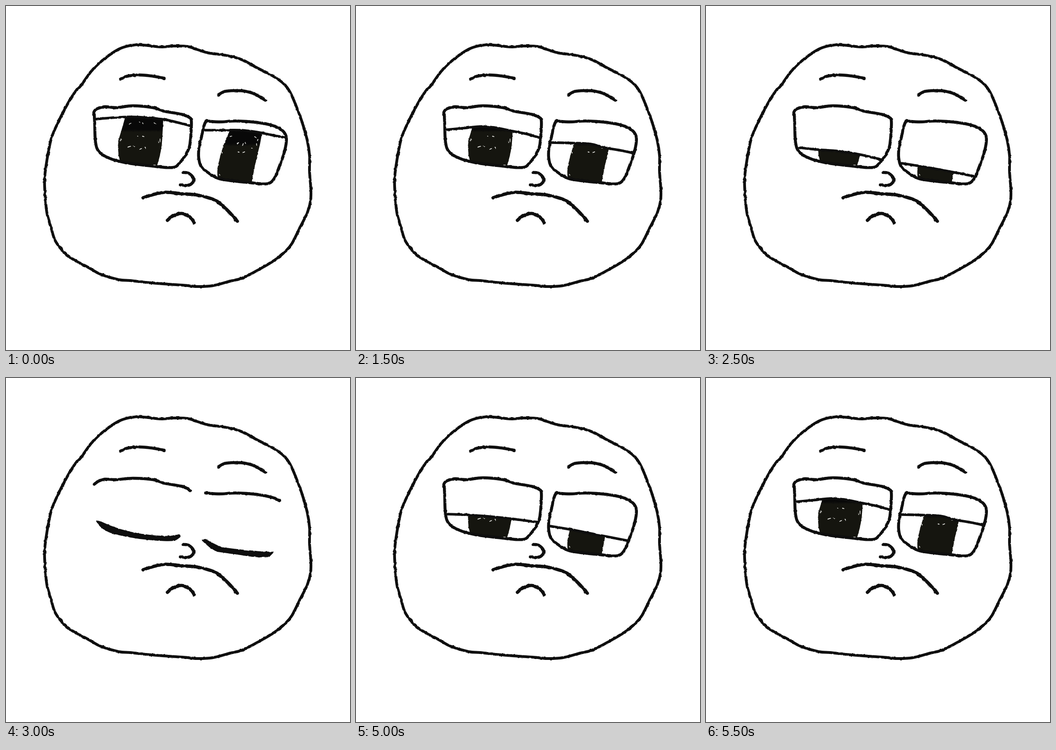
Write an HTML page that moves like this. It is 748x748 px and loops after 6 s.

```html
<!DOCTYPE html>
<html lang="en">
<head>
<meta charset="utf-8">
<title>Sleepy face</title>
<style>
  html, body { margin: 0; width: 100%; height: 100%; overflow: hidden; background: #fff; }
  svg { display: block; width: 100%; height: 100%; }
  path { fill: none; stroke: #0e0e0e; stroke-width: 6.4; stroke-linecap: round; stroke-linejoin: round; }
  .head { stroke-width: 6; }
  .bold { stroke-width: 7.2; }
  .lid { stroke-width: 5.6; }
  .iris { fill: url(#ink); stroke: none; }
  .specks { stroke: #f4f4f0; stroke-width: 1.5; }
  .cover { fill: #fff; stroke: none; }
  .lash { fill: #0e0e0e; stroke-width: 2; }

  .timed { opacity: 0; animation: 6s step-end infinite; }
  .open { animation-name: open; }
  .wide { animation-name: wide; }
  .drowsy { animation-name: drowsy; }
  .heavy { animation-name: heavy; }
  .narrow { animation-name: narrow; }
  .closed { animation-name: closed; }
  @keyframes open { 0%, 75% { opacity: 1 } 50% { opacity: 0 } }
  @keyframes wide { 0% { opacity: 1 } 25%, 100% { opacity: 0 } }
  @keyframes drowsy { 0%, 33.333%, 100% { opacity: 0 } 25%, 91.666% { opacity: 1 } }
  @keyframes heavy { 0%, 41.666%, 91.666% { opacity: 0 } 33.333%, 83.333% { opacity: 1 } }
  @keyframes narrow { 0%, 50%, 83.333% { opacity: 0 } 41.666%, 75% { opacity: 1 } }
  @keyframes closed { 0%, 75% { opacity: 0 } 50% { opacity: 1 } }
</style>
</head>
<body>
<svg viewBox="0 0 748 748">
  <defs>
    <linearGradient id="ink" x2="0" y2="1">
      <stop offset=".25" stop-color="#080808"/>
      <stop offset=".3" stop-color="#15150f"/>
    </linearGradient>
    <!-- Roughens the pen strokes slightly. -->
    <filter id="rough" filterUnits="userSpaceOnUse" x="0" y="0" width="748" height="748" color-interpolation-filters="sRGB">
      <feTurbulence type="fractalNoise" baseFrequency=".14" numOctaves="2" seed="4"/>
      <feDisplacementMap in="SourceGraphic" scale="3" xChannelSelector="R" yChannelSelector="G"/>
    </filter>
  </defs>
  <g filter="url(#rough)">
    <g class="timed open">
      <path class="iris" d="M259 242Q252 268 245 290Q241 315 249 341L328 349Q339 315 340 285L342 244Z"/>
      <path class="iris" d="M487 270Q470 305 463 338Q457 360 461 377L534 385Q542 340 552 302L557 275Z"/>
      <path class="specks" d="M268 257l3-2M289 252l2 1M297 254l1 2M322 254l3 2M265 307l6-2M277 304l3 2M291 311l4-1M302 307l2 3M297 283l3 1M286 283l1 0M249 293l1-3M335 289l0 7M331 294l1 3M321 345l3 0"/>
      <path class="specks" d="M488 284l3-1M502 299l4-2M514 303l2-4M520 297l1 2M541 284l2 2M547 289l0 4M545 299l-1 4M505 317l2 1M515 319l4-2M534 309l2 1M470 318l0 2M464 366l1 2"/>
    </g>

    <g class="timed wide">
      <path class="lid" data-points="195,246 230,243 270,241 310,243 350,248 380,255 403,261"/>
      <path class="lid" data-points="429,270 470,270 510,270 545,274 580,281 607,286"/>
    </g>
    <g class="timed drowsy">
      <path class="lid" data-points="197,269 240,265 270,262 300,264 340,272 370,278 398,286"/>
      <path class="lid" data-points="425,297 470,298 510,300 540,308 575,314 604,320"/>
    </g>
    <g class="timed heavy">
      <path class="lid" data-points="200,296 250,298 320,304 392,313"/>
      <path class="lid" data-points="422,322 470,330 530,342 592,354"/>
    </g>
    <g class="timed narrow">
      <path class="lid" data-points="203,308 240,312 290,316 340,324 384,335"/>
      <path class="lid" data-points="426,342 470,349 530,360 587,371"/>
    </g>

    <g class="timed open">
      <path data-points="192,237 191,231 197,224 215,219 240,221 276,217 320,221 345,229 380,235 398,242 403,250 402,280 399,305 390,325 376,343 364,351 335,350 300,346 262,341 230,333 208,322 198,310 194,290 193,260 192,237"/>
      <path data-points="435,250 465,252 500,250 545,253 580,260 600,270 609,283 609,300 603,325 594,350 585,372 575,384 560,387 530,384 500,381 465,376 445,366 425,350 419,330 420,305 425,285 430,262 435,250"/>
    </g>

    <g class="timed closed">
      <path data-points="192,231 200,225 215,220 240,221 276,218 320,221 345,229 380,235 392,239 400,245"/>
      <path data-points="434,250 465,252 500,250 545,253 580,260 595,267"/>
      <path class="lash" d="M197 311L204 312Q245 332 290 339Q335 346 360 344L377 340L379 345L368 353Q345 355 310 351Q265 347 228 336Q205 327 197 311Z"/>
      <path class="lash" d="M427 353L434 351Q452 362 470 369Q515 375 555 378L581 379L572 388Q550 391 510 384L460 377Q445 371 427 353Z"/>
    </g>

    <path class="head" data-points="285,84 310,86 337,89 365,87 395,88 420,96 440,102 470,106 495,111 518,119 545,134 580,152 605,170 618,188 630,215 643,250 655,292 660,325 660,360 663,400 662,425 655,450 640,480 622,516 608,533 585,552 550,573 515,591 485,599 450,608 415,610 385,607 340,604 305,601 270,597 245,595 205,583 180,569 155,556 131,540 108,512 98,482 89,450 85,410 84,375 89,335 98,290 110,260 130,220 150,187 163,173 187,140 215,114 245,94 265,87 285,84"/>
    <path data-points="249,159 262,153 290,150 315,152 344,157"/>
    <path data-points="462,193 475,186 495,184 518,185 540,191 564,205"/>
    <path data-points="385,362 395,363 404,369 408,377 405,385 396,390 379,389"/>
    <path class="bold" data-points="298,417 320,410 347,405 380,408 415,411 440,417 458,424 475,438 490,453 503,468"/>
    <path class="bold" data-points="351,466 362,457 381,451 395,456 404,463 409,471"/>
  </g>
</svg>
<script>
  // Smooth curve through every point (Catmull-Rom as cubic Béziers).
  function smooth(points) {
    const at = i => points[Math.max(0, Math.min(points.length - 1, i))];
    const handle = (i, sign) => at(i).map((v, k) => v + sign * (at(i + 1)[k] - at(i - 1)[k]) / 6);
    let d = `M${at(0)}`;
    for (let i = 1; i < points.length; i++) d += `C${handle(i - 1, 1)} ${handle(i, -1)} ${at(i)}`;
    return d;
  }

  for (const path of document.querySelectorAll('[data-points]')) {
    const points = path.dataset.points.split(' ').map(p => p.split(',').map(Number));
    const d = smooth(points);
    path.setAttribute('d', d);
    // A lid hides the iris above its edge.
    if (path.matches('.lid')) {
      const cover = path.cloneNode();
      cover.setAttribute('class', 'cover');
      cover.setAttribute('d', `${d}V225H${points[0][0]}Z`);
      path.before(cover);
    }
  }
</script>
</body>
</html>
```
